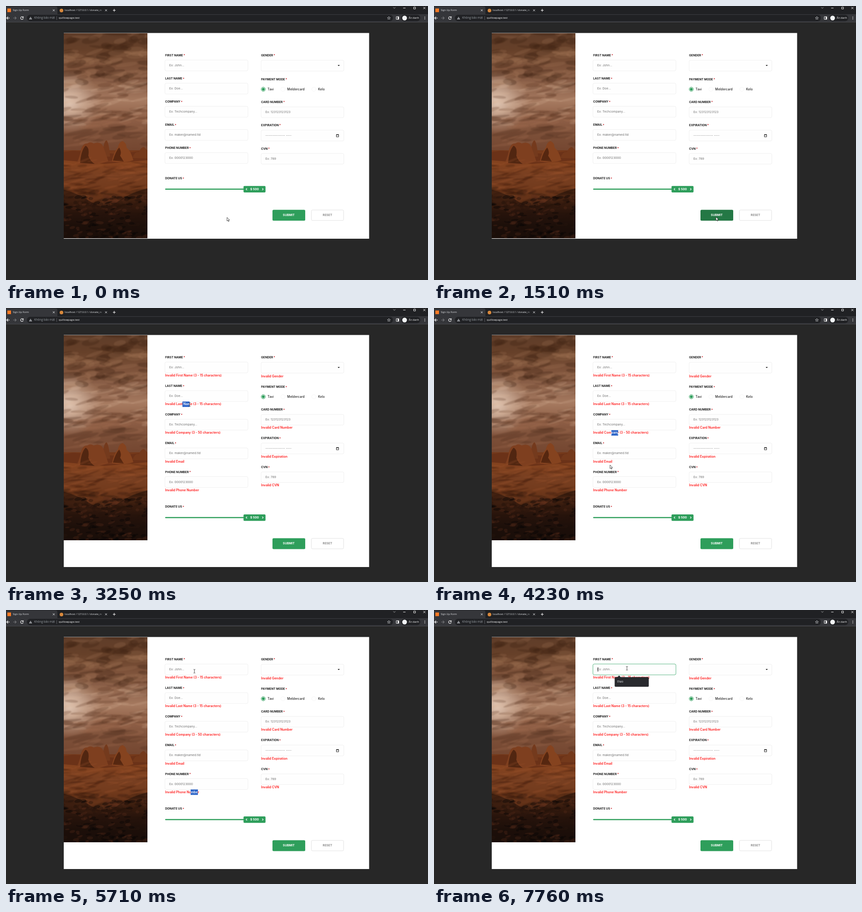
Animation of 928x604 px, one loop 8 s. Source, as an HTML page with a canvas:

```html
<!DOCTYPE html>
<html lang="vi">
<head>
<meta charset="utf-8">
<title>Sign Up Form</title>
<style>
html, body { margin: 0; width: 100%; height: 100%; overflow: hidden; background: #272727; }
canvas { display: block; }
</style>
</head>
<body>
<canvas id="stage" width="928" height="604"></canvas>
<script>
const ctx = document.getElementById('stage').getContext('2d');
const LOOP = 8000;
const GREEN = '#2e9e5b', RED = '#ff1717', WHITE = '#fff';
const FORM = 'Inter, sans-serif', UI = '"Open Sans", "Noto Sans", sans-serif';
const CLICK = 1600;       // the form is sent and the errors appear
const STEP = 12.1;        // extra height of one error line

const between = (t, ...spans) => spans.some(([a, b]) => t >= a && t < b);

// ---------- drawing helpers ----------
function text(s, x, y, size, color, weight = 400, family = FORM, align = 'left') {
  ctx.font = `${weight} ${size}px ${family}`;
  ctx.textAlign = align;
  ctx.textBaseline = 'middle';
  ctx.fillStyle = color;
  ctx.fillText(s, x, y);
  return ctx.measureText(s).width;
}
function box(x, y, w, h, r, fill, stroke) {
  ctx.beginPath();
  ctx.roundRect(x, y, w, h, r);
  if (fill) { ctx.fillStyle = fill; ctx.fill(); }
  if (stroke) { ctx.strokeStyle = stroke; ctx.lineWidth = 1; ctx.stroke(); }
}
function disc(x, y, r, fill, stroke) {
  ctx.beginPath();
  ctx.arc(x, y, r, 0, 7);
  if (fill) { ctx.fillStyle = fill; ctx.fill(); }
  if (stroke) { ctx.strokeStyle = stroke; ctx.lineWidth = 1; ctx.stroke(); }
}
function path(d, x, y, stroke, width = 1, fill) {
  ctx.save();
  ctx.translate(x, y);
  const p = new Path2D(d);
  if (fill) { ctx.fillStyle = fill; ctx.fill(p); }
  if (stroke) { ctx.strokeStyle = stroke; ctx.lineWidth = width; ctx.stroke(p); }
  ctx.restore();
}

// ---------- desert picture, painted once ----------
function paintDesert() {
  const cv = document.createElement('canvas');
  cv.width = 184; cv.height = 452;
  const c = cv.getContext('2d');
  let seed = 11;
  const rnd = (a, b) => a + (b - a) * ((seed = seed * 16807 % 2147483647) / 2147483647);
  const fade = (y0, y1, colors) => {
    const g = c.createLinearGradient(0, y0, 0, y1);
    colors.forEach((k, i) => g.addColorStop(i / (colors.length - 1), k));
    c.fillStyle = g;
    c.fillRect(0, y0, 184, y1 - y0);
  };
  const blobs = (n, y0, y1, rx, ry, colors) => {
    for (let i = 0; i < n; i++) {
      c.fillStyle = colors[i % colors.length];
      c.beginPath();
      c.ellipse(rnd(-10, 194), rnd(y0, y1), rnd(rx / 3, rx), rnd(ry / 3, ry), rnd(-.4, .15), 0, 7);
      c.fill();
    }
  };
  const rock = (d, color) => { c.fillStyle = color; c.fill(new Path2D(d)); };

  // sky
  fade(0, 262, ['#5f3d29', '#664029', '#7d523a', '#8c614a', '#a67a60', '#8f6047', '#7c4f38', '#744630']);
  const glow = c.createRadialGradient(12, 152, 2, 12, 152, 70);
  glow.addColorStop(0, 'rgba(232,208,190,.85)');
  glow.addColorStop(1, 'rgba(232,208,190,0)');
  c.fillStyle = glow;
  c.fillRect(0, 80, 90, 150);
  c.filter = 'blur(1px)';
  blobs(90, 0, 120, 30, 8, ['rgba(62,34,20,.32)', 'rgba(165,118,88,.22)']);
  blobs(70, 95, 200, 32, 5, ['rgba(88,50,32,.26)', 'rgba(214,178,152,.22)']);
  blobs(36, 180, 245, 40, 6, ['rgba(82,46,30,.3)', 'rgba(170,116,88,.2)']);
  c.filter = 'none';

  // plain, darkening towards the viewer
  fade(258, 452, ['#74391b', '#84431f', '#783f21', '#733b1d', '#5c2f18', '#32190f', '#1d100b', '#170d09']);
  rock('M0 262L20 259L60 262L120 266L184 258V280L90 288L0 280Z', '#6b3218');
  rock('M85 272Q87 238 94 236Q99 240 102 272Z', '#743a1d');
  rock('M28 288Q36 270 38 256Q42 242 52 243Q58 238 66 243Q82 238 87 250Q92 264 98 282Q60 294 28 288Z', '#7e3f1f');
  rock('M36 286Q38 258 48 248Q57 252 54 270Q58 282 68 288Z', '#512611');
  rock('M106 282Q110 262 119 252Q122 238 130 238Q138 242 138 252Q148 260 153 280Q128 288 106 282Z', '#85431f');
  rock('M108 281Q114 260 122 252Q128 262 124 270L132 283Z', '#562710');
  rock('M151 275Q156 260 165 262Q172 248 178 252L184 259V276Z', '#74391b');
  c.filter = 'blur(1px)';
  blobs(90, 280, 355, 28, 2.5, ['rgba(60,26,10,.3)', 'rgba(170,92,50,.22)']);
  blobs(60, 345, 385, 22, 5, ['rgba(36,17,9,.3)', 'rgba(110,56,28,.2)']);
  c.filter = 'none';
  rock('M0 345Q30 352 60 372Q90 392 120 370Q150 350 184 342V452H0Z', 'rgba(28,14,9,.5)');
  blobs(220, 358, 452, 9, 4, ['rgba(8,5,4,.4)', 'rgba(92,48,28,.28)', 'rgba(38,20,13,.4)']);
  return cv;
}
const desert = paintDesert();

// ---------- browser frame ----------
function drawBrowser() {
  ctx.fillStyle = '#272727';
  ctx.fillRect(0, 0, 928, 604);
  ctx.fillStyle = '#202124';
  ctx.fillRect(0, 0, 928, 18);
  box(-6, 1, 119, 22, 4, '#35363a');
  ctx.fillStyle = '#35363a';
  ctx.fillRect(0, 18, 928, 18);
  ctx.fillStyle = '#4a4b4e';
  ctx.fillRect(0, 35, 928, 1);

  box(3, 5.5, 8, 8, 0, '#fb7a24');
  text('Sign Up Form', 15, 9.5, 5.6, '#e8eaed', 500, UI);
  disc(122, 10, 4, '#d8883c');
  const fade = ctx.createLinearGradient(204, 0, 214, 0);
  fade.addColorStop(0, '#e8eaed');
  fade.addColorStop(1, '#202124');
  text('localhost / 127.0.0.1 / donate_re', 129, 9.5, 5.5, fade, 500, UI);
  const cross = 'M-2-2L2 2M2-2L-2 2';
  path(cross, 105, 9.5, '#e8eaed');
  path(cross, 220, 9.5, '#e8eaed');
  path('M-3 0H3M0-3V3', 238, 9.5, WHITE, 1.1);
  path('M-2.5-1.2L0 1.3L2.5-1.2', 854, 4, '#c8c9cb', .8);
  path('M-2.5 0H2.5', 876, 4.5, WHITE);
  path('M-2-2H2V2H-2Z', 898.5, 4.5, WHITE, .9);
  path('M-2.3-2.3L2.3 2.3M2.3-2.3L-2.3 2.3', 920, 4.5, WHITE, .9);

  path('M3.5 0H-3M0-3L-3 0L0 3', 4.5, 26.5, WHITE, 1.1);
  path('M-3.5 0H3M0-3L3 0L0 3', 19.5, 26.5, '#77787b', 1.1);
  path('M2.4-1.8A3 3 0 1 0 3 .6M3-3.6V-1H.4', 35, 26.5, WHITE, 1.1);
  box(46, 19.5, 805, 14, 7, '#202124');
  path('M0-3L3.5 3H-3.5Z', 54, 26.5, null, 0, '#a5a8ad');
  path('M0-1V1M0 1.5V2.3', 54, 26.5, '#202124', .7);
  text('Không bảo mật', 62, 26.5, 6.4, '#9aa0a6', 400, UI);
  path('M0-4V4', 111.5, 26.5, '#6a6d72', .8);
  text('quillowpage.test', 116, 26.5, 6, WHITE, 500, UI);
  path('M0-3.3L1-1.1L3.3-1L1.5.6L2.1 2.9L0 1.6L-2.1 2.9L-1.5.6L-3.3-1L-1-1.1Z', 842, 26.5, '#d0d2d5', .8);
  path('M-2.8-2.8H2.8V2.8H-2.8Z', 861, 26.5, WHITE);
  path('M.5-2.8H2.8V2.8H.5Z', 861, 26.5, null, 0, WHITE);
  box(869, 19.5, 42, 14, 7, '#202124');
  disc(876.5, 26.5, 5.2, '#f1f3f4');
  text('Ẩn danh', 885.5, 26.5, 5.8, WHITE, 500, UI);
  [-2.5, 0, 2.5].forEach(d => disc(921, 26.5 + d, .75, WHITE));
}

// ---------- form ----------
const LEFT = [
  ['FIRST NAME', 'Ex: John...', 'Invalid First Name (3 - 15 characters)'],
  ['LAST NAME', 'Ex: Doe...', 'Invalid Last Name (3 - 15 characters)'],
  ['COMPANY', 'Ex: Techcompany...', 'Invalid Company (3 - 50 characters)'],
  ['EMAIL', 'Ex: maker@named.tld', 'Invalid Email'],
  ['PHONE NUMBER', 'Ex: 0000123000', 'Invalid Phone Number']
];
// label, placeholder, error, label y, field top, field height, error y, errors above
const RIGHT = [
  ['GENDER', '', 'Invalid Gender', 109, 119, 25, 151, 0],
  ['CARD NUMBER', 'Ex: 123123123123', 'Invalid Card Number', 212, 222, 24.5, 252, 1],
  ['EXPIRATION', '-------------- ----', 'Invalid Expiration', 263, 273, 25, 304, 2],
  ['CVN', 'Ex: 789', 'Invalid CVN', 315, 324.5, 24.5, 355, 3]
];
const rowY = (i, sent) => 109 + i * (51.05 + (sent ? STEP : 0));

function label(s, x, y) {
  const w = text(s, x, y, 6.4, '#1c1c1c', 700);
  text('*', x + w + 1, y + .5, 6.6, '#c4161c', 700);
}
function field(x, y, w, h, hint, focused) {
  box(x + .5, y + .5, w - 1, h - 1, 3, '#fefefe', focused ? '#58b582' : '#f0f0f0');
  text(hint, x + 10, y + h / 2, 6.7, '#6f6f6f');
}
const error = (s, x, y, color = RED) => text(s, x, y, 7, color, 600);

// row, drag start, drag end, cleared, from x, to x
const PICKS = [
  [0, 2690, 2900, 3100, 388, 418],
  [1, 3100, 3350, 3680, 388, 412],
  [2, 3680, 3880, 4600, 405, 390],
  [4, 4600, 4800, 5830, 406, 422]
];
function drawPick(t) {
  const pick = PICKS.find(p => between(t, [p[1], p[3]]));
  if (!pick) return;
  const [row, start, end, , from, to] = pick;
  const x = from + (to - from) * ease((t - start) / (end - start));
  const y = rowY(row, true) + 40;
  ctx.save();
  ctx.beginPath();
  ctx.rect(Math.min(from, x), y - 6, Math.abs(x - from), 12);
  ctx.fillStyle = '#2d65c8';
  ctx.fill();
  ctx.clip();
  error(LEFT[row][2], 350, y, WHITE);
  ctx.restore();
}

function drawForm(t, pos) {
  const sent = t >= CLICK;
  const shift = sent ? 58.2 : 0;
  const focused = between(t, [5830, 6690], [6770, LOOP]);

  ctx.fillStyle = WHITE;
  ctx.fillRect(127, 59.5, 671.5, sent ? 511.5 : 453.5);
  ctx.drawImage(desert, 127, 60);

  LEFT.forEach(([name, hint, err], i) => {
    const y = rowY(i, sent);
    label(name, 350, y);
    field(349, y + 9.5, 183.5, 25, hint, focused && i === 0);
    if (sent) error(err, 350, y + 40);
  });
  RIGHT.forEach(([name, hint, err, y, top, h, errY, above]) => {
    const d = sent ? above * STEP : 0;
    label(name, 561, y + d);
    field(560.5, top + d, 183, h, hint);
    if (sent) error(err, 561, errY + d);
  });
  path('M-2.3-1.1H2.3L0 1.5Z', 731.7, 131, null, 0, '#111');
  const dateY = 285.5 + (sent ? 2 * STEP : 0);
  path('M-2.5-2H2.5V3H-2.5ZM-2.5-1.5H2.5M-1.5-3V-2M1.5-3V-2', 729, dateY, '#111', .9);

  const payY = sent ? STEP : 0;
  label('PAYMENT MODE', 561, 162 + payY);
  [['Tavi', 565.8], ['Meldercard', 609], ['Kelo', 677]].forEach(([s, x], i) => {
    disc(x, 183.5 + payY, 4.6, WHITE, i ? '#f6f6f6' : GREEN);
    if (!i) disc(x, 183.5 + payY, 3.1, GREEN);
    text(s, x + 9.3, 183.5 + payY, 7, '#222', 500);
  });

  label('DONATE US', 350, 380.3 + shift);
  const y = 403.8 + shift;
  box(350, y - 1.3, 180, 2.6, 1, GREEN);
  box(522.3, y - 7.1, 48.4, 14.3, 2, GREEN);
  path('M1.2-2.2L-1.2 0L1.2 2.2', 529, y, WHITE, 1.1);
  path('M-1.2-2.2L1.2 0L-1.2 2.2', 564.5, y, WHITE, 1.1);
  text('$ 500', 546.5, y, 6.7, WHITE, 700, FORM, 'center');

  const top = 449.2 + shift;
  const hover = inside(pos, 586, top, 72, 24);
  box(586, top, 72, 24, 2.5, hover ? '#247845' : GREEN);
  text('SUBMIT', 621.8, top + 12, 6.6, WHITE, 700, FORM, 'center');
  box(671.5, top + .5, 71, 23, 2.5, WHITE, '#e2e2e2');
  text('RESET', 707, top + 12, 6.5, '#8b8b8b', 700, FORM, 'center');

  drawPick(t);
  if (between(t, [5830, 6330], [6770, 7270], [7760, LOOP])) path('M0 0V9.5', 360.5, 126.3, '#111');
  if (between(t, [6480, 6690], [7090, LOOP])) {
    path('M0 0L4 4H-4Z', 407, 144.3, null, 0, '#292a2e');
    box(397.3, 148, 75, 21.3, 2, '#292a2e');
    text('thao', 403, 158.7, 6.2, '#e8eaed', 400, UI);
  }
}

// ---------- pointer ----------
// time, x, y
const TRACK = [
  [0, 486, 466], [270, 486, 466], [450, 428, 330], [620, 540, 158], [820, 731, 290],
  [1000, 660, 474], [1200, 620, 465], [1640, 620, 465], [1900, 509, 511], [2130, 379, 112],
  [2300, 370, 130], [2690, 388, 149], [2900, 418, 149], [3100, 388, 212], [3350, 412, 213],
  [3520, 405, 264], [3680, 405, 276], [3880, 390, 276], [4230, 387, 346], [4320, 388, 346],
  [4600, 406, 402], [4800, 422, 402], [5150, 500, 410], [5400, 583, 300], [5600, 480, 160],
  [5710, 414, 135], [5850, 421, 134], [6050, 421, 134], [6120, 432, 132], [6470, 432, 132],
  [6630, 429, 105], [6770, 424, 129], [7600, 424, 129], [7610, 424, 128.5], [LOOP, 424, 128.5]
];
function ease(k) {
  k = Math.min(1, Math.max(0, k));
  return k * k * (3 - 2 * k);
}
const inside = (p, x, y, w, h) => p.x >= x && p.x <= x + w && p.y >= y && p.y <= y + h;

function pointerAt(t) {
  const i = TRACK.findIndex(p => p[0] > t);
  const [t0, x0, y0] = TRACK[i - 1], [t1, x1, y1] = TRACK[i];
  const k = ease((t - t0) / (t1 - t0));
  return { x: x0 + (x1 - x0) * k, y: y0 + (y1 - y0) * k };
}
function overText(t, p) {
  const sent = t >= CLICK;
  return LEFT.some(([, , err], i) => {
    const y = rowY(i, sent);
    return inside(p, 350, y + 10, 182, 24) ||
      sent && inside(p, 350, y + 35, err.length * 3.3, 10);
  }) || RIGHT.slice(1).some(r => inside(p, 561, r[4] + (sent ? r[7] * STEP : 0), 182, 24));
}
function drawPointer(t, p) {
  if (overText(t, p)) {
    path('M-2-4H-.6L0-3.5L.6-4H2M0-3.5V3.5M-2 4H-.6L0 3.5L.6 4H2', p.x + .3, p.y, '#222', .8);
  } else {
    path('M0 0V8L1.9 6.3L3.2 9.2L4.5 8.7L3.3 5.8H5.7Z', p.x, p.y, '#222', .8, WHITE);
  }
}

function frame(now) {
  const t = now % LOOP;
  const pos = pointerAt(t);
  drawBrowser();
  drawForm(t, pos);
  drawPointer(t, pos);
  requestAnimationFrame(frame);
}
requestAnimationFrame(frame);
</script>
</body>
</html>
```
